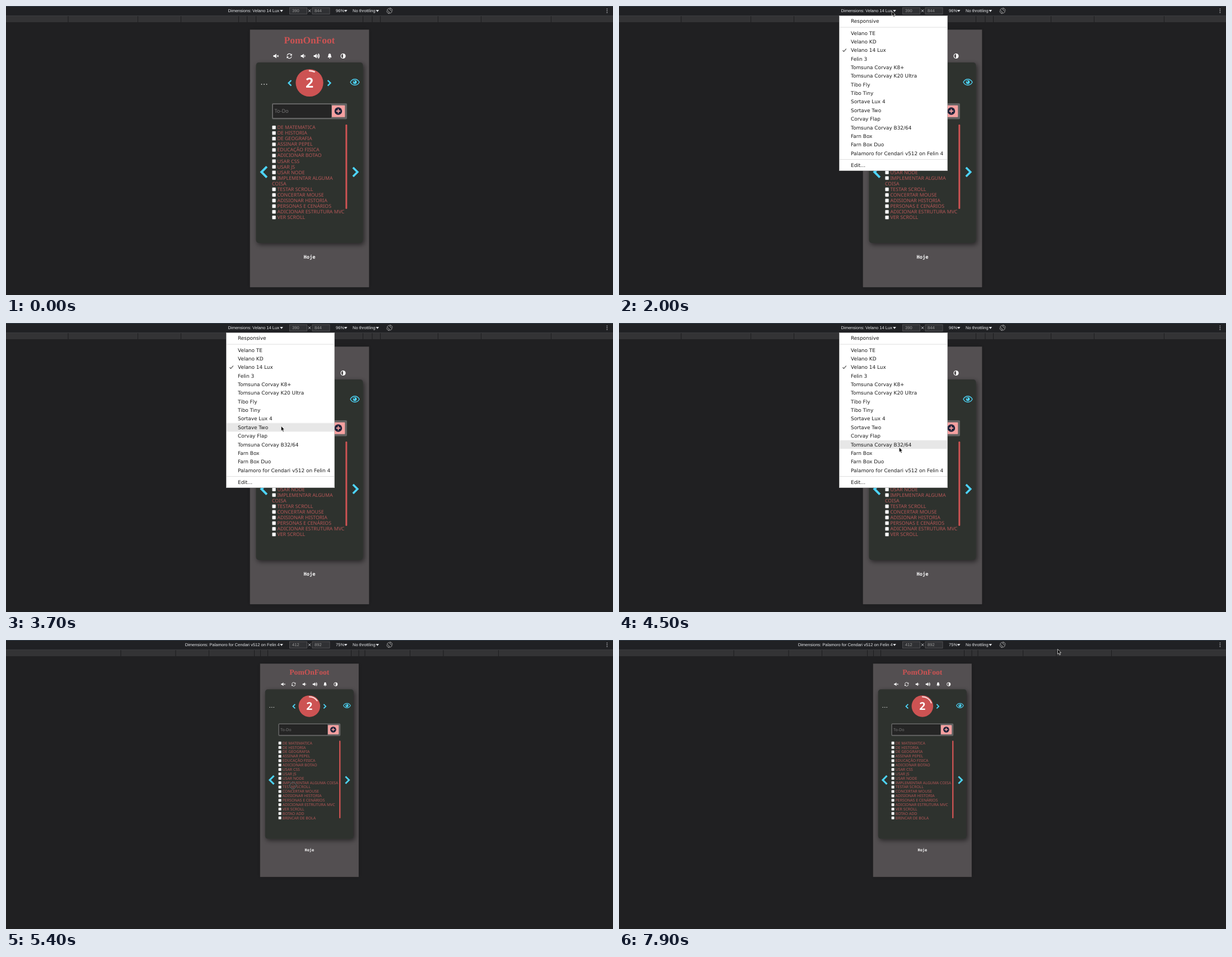
Write an HTML page that moves like this. It is 1084 by 517 pixels and loops after 8 s.

```html
<!DOCTYPE html>
<html lang="pt">
<head>
<meta charset="utf-8">
<title>Device preview</title>
<style>
html, body { margin: 0; width: 100%; height: 100%; overflow: hidden; background: #202022; }
svg { display: block; width: 100vw; height: 100vh; text-rendering: geometricPrecision; }
text { white-space: pre; }
.bar { font: 7.55px "Liberation Sans", Arial, sans-serif; fill: #e4e6e9; }
.bar .dim { fill: #999; }
.title { font: bold 17.4px "Liberation Serif", Times, serif; fill: #cd5353; text-anchor: middle; }
.list { font: 8.78px "Noto Sans", sans-serif; fill: #b45757; }
.hint { font: 9.2px "Noto Sans", sans-serif; fill: #777; }
.count { font: 800 24.5px "Noto Sans", "Open Sans", sans-serif; fill: #fff; text-anchor: middle; }
.today { font: bold 8.71px "DejaVu Sans Mono", monospace; fill: #fff; text-anchor: middle; }
.menu { font: 8.93px "DejaVu Sans", sans-serif; fill: #1c1c1c; }
.line { fill: none; stroke-linecap: round; stroke-linejoin: round; }
.cyan { fill: none; stroke: #4dd4f7; }

#before, #after, #menu, #row, #arrow, #wait { animation: 8s step-end infinite; }
#before { animation-name: before; }
#after { animation-name: after; }
#menu { animation-name: menu; }
#row { animation-name: row; }
#arrow { animation-name: move; }
#wait { animation-name: wait; }
.arc { animation: arc 8s linear infinite; }

@keyframes arc { from { stroke-dasharray: 24 360; } to { stroke-dasharray: 70 360; } }
@keyframes before { 0% { visibility: visible; } 67.5%, 100% { visibility: hidden; } }
@keyframes after { 0% { visibility: hidden; } 67.5%, 100% { visibility: visible; } }
@keyframes menu { 0% { visibility: hidden; } 25% { visibility: visible; } 67.5%, 100% { visibility: hidden; } }
@keyframes wait { 0% { visibility: hidden; } 67.5% { visibility: visible; } 73.75%, 100% { visibility: hidden; } }
@keyframes row {
  0% { opacity: 0; }
  37.5% { opacity: 1; transform: translateY(calc(5 * 15.37px)); }
  38.75% { opacity: 1; transform: translateY(calc(6 * 15.37px)); }
  41.25% { opacity: 1; transform: translateY(calc(7 * 15.37px)); }
  42.5% { opacity: 1; transform: translateY(calc(8 * 15.37px)); }
  43.75% { opacity: 1; transform: translateY(calc(9 * 15.37px)); }
  56.25% { opacity: 1; transform: translateY(calc(11 * 15.37px)); }
  57.5%, 100% { opacity: 1; transform: translateY(calc(14 * 15.37px)); }
}
@keyframes move {
  0% { transform: translate(528px, -14px); }
  5% { transform: translate(528px, -12px); animation-timing-function: steps(8); }
  15% { transform: translate(486px, 1px); animation-timing-function: steps(7); }
  23.75% { transform: translate(487px, 9px); }
  30% { transform: translate(487px, 13px); }
  31.25% { transform: translate(488px, 17px); }
  37.5% { transform: translate(493px, 121px); }
  38.75% { transform: translate(492px, 145px); }
  41.25% { transform: translate(492px, 158px); }
  42.5% { transform: translate(491px, 172px); }
  43.75% { transform: translate(491px, 183px); }
  46.25% { transform: translate(491px, 184px); }
  52.5% { transform: translate(490px, 183px); }
  53.75% { transform: translate(491px, 184px); }
  56.25% { transform: translate(500px, 222px); }
  57.5% { transform: translate(513px, 258px); }
  60% { transform: translate(513px, 259px); }
  61.25% { transform: translate(514px, 259px); }
  63.75% { transform: translate(512px, 260px); }
  67.5% { transform: translate(512px, -20px); }
  73.75% { transform: translate(540px, 221px); }
  76.25% { transform: translate(450px, 79px); }
  78.75% { transform: translate(418px, 23px); }
  81.25% { transform: translate(420px, 4px); }
  83.75% { transform: translate(422px, 5px); }
  85% { transform: translate(426px, 8px); }
  87.5% { transform: translate(480px, 20px); }
  88.75% { transform: translate(570px, 40px); }
  91.25% { transform: translate(721px, 44px); }
  93.75% { transform: translate(751px, 41px); }
  96.25% { transform: translate(750px, 40px); }
  98.75%, 100% { transform: translate(783px, 16px); }
}
</style>
</head>
<body>
<svg id="stage" viewBox="0 0 1084 517" preserveAspectRatio="none"></svg>
<script>
const rect = (x, y, w, h, fill, more = '') =>
  `<rect x="${x}" y="${y}" width="${w}" height="${h}" fill="${fill}" ${more}/>`;
const text = (x, y, s, cls = '') => `<text x="${x}" y="${y}" class="${cls}">${s}</text>`;
const at = (x, y, k, body) => `<g transform="translate(${x} ${y}) scale(${k})">${body}</g>`;
const path = (d, more = '') => `<path d="${d}" ${more}/>`;
const each = (list, fn) => list.map(fn).join('');

const speaker = path('M-4.5-1.5h2L.8-4V4L-2.5 1.5h-2Z', 'fill="#fff"');
const stroke = d => path(d, 'class="line" stroke="#fff" stroke-width="1.1"');
const icons = [
  speaker + stroke('M2.3-1.1 4.5 1.1M4.5-1.1 2.3 1.1'),
  stroke('M-4-1A4.1 4.1 0 0 1 3.4-2.4M4 1A4.1 4.1 0 0 1-3.4 2.4') +
    path('M4.6-4.2V-.8H1.2ZM-4.6 4.2V.8h3.4Z', 'fill="#fff"'),
  `<g transform="translate(1)">${speaker}${stroke('M2.3-1.4a2 2 0 0 1 0 2.8')}</g>`,
  speaker + stroke('M2-1.3a1.8 1.8 0 0 1 0 2.6M3-2.7a3.8 3.8 0 0 1 0 5.4M4-4a5.6 5.6 0 0 1 0 8'),
  path('M0-4.6C2-4.2 2.4-2.6 2.4-1 2.4 1 3.5 1.7 3.5 2.5h-7C-3.5 1.7-2.4 1-2.4-1-2.4-2.6-2-4.2 0-4.6ZM-1.2 3.2h2.4a1.2 1.2 0 0 1-2.4 0Z', 'fill="#fff"'),
  '<circle r="4" fill="none" stroke="#fff" stroke-width="1.2"/>' + path('M0-4a4 4 0 0 1 0 8Z', 'fill="#fff"')
];
const eye = path('M-8 0C-4.5-7 4.5-7 8 0 4.5 7-4.5 7-8 0Z', 'class="cyan" stroke-width="1.4"') +
  '<circle r="3.4" cy="-.1" fill="#4dd4f7"/><circle r="1.2" cx="-1.2" cy="-1.2" fill="#2d302f"/>';
const dots = each([-4.5, 0, 4.5], x => `<circle cx="${x}" r=".85" fill="#fff"/>`);
const dial = '<circle r="24.6" fill="#cd5353"/>' +
  '<circle class="arc line" r="21.6" pathLength="360" transform="rotate(-90)" stroke="#f8dddd" stroke-width="2.6"/>' +
  text(0, 8.8, '2', 'count');
const plus = '<circle r="6.8" fill="#20233a"/>' + path('M-3.7 0h7.4M0-3.7v7.4', 'stroke="#f5a0a0" stroke-width="1.8"');
const chevron = (dir, w, h, weight) =>
  path(`M${-dir * w} ${-h}L${dir * w} 0 ${-dir * w} ${h}`, `class="cyan" stroke-width="${weight}"`);

const tasks = ['DE MATEMATICA', 'DE HISTORIA', 'DE GEOGRAFIA', 'ASSINAR PEPEL', 'EDUCAÇÃO FISICA',
  'ADICIONAR BOTAO', 'USAR CSS', 'USAR JS', 'USAR NODE', 'IMPLEMENTAR ALGUMA COISA', 'TESTAR SCROLL',
  'CONCERTAR MOUSE', 'ADISIONAR HISTORIA', 'PERSONAS E CENÁRIOS', 'ADICIONAR ESTRUTURA MVC',
  'VER SCROLL', 'BOTAO ADD', 'BRINCAR DE BOLA'];

// A task line starting with "+" continues the one above, without a checkbox.
const task = (s, i) => s[0] === '+'
  ? text(0, i * 10.06 + 3.1, s.slice(1), 'list')
  : rect(.3, i * 10.06 - 3.1, 6.5, 6.5, '#fff', 'rx="1.2" stroke="#767676" stroke-width=".5"') +
    text(9.4, i * 10.06 + 3.1, s, 'list');

// zoom scales the contents, room scales the space they are spread over.
function phone(cx, zoom, room, lines, barEnd) {
  const put = (x, y, body) => at(x * room, y * room, zoom, body);
  const cardTop = 42 + 59 * zoom, mid = 87 * room;
  const barTop = 111 * room;
  const card = rect(-95.5 * room, 0, 191 * room, 323 * room, '#2d302f', 'rx="5" filter="url(#shade)"') +
    put(-81, 39, dots) + put(81, 35.2, eye) + put(0, 36.5, dial) +
    at(-35 * zoom, 36.8 * room, zoom, chevron(-1, 2.4, 4.8, 2.4)) +
    at(35 * zoom, 36.8 * room, zoom, chevron(1, 2.4, 4.8, 2.4)) +
    put(-81, 196, chevron(-1, 4.8, 9.6, 4)) + put(81.7, 196, chevron(1, 4, 8, 3.6)) +
    rect(-67 * room, mid - 14 * zoom, 134 * room, 28.6 * zoom, '#626262', 'rx="2"') +
    rect(-64.5 * room, mid - 11.2 * zoom, 103 * room, 22.6 * zoom, '#252525', 'stroke="#171717" stroke-width=".8"') +
    rect(40 * room, mid - 10.2 * zoom, 23.3 * room, 21 * zoom, '#f5a0a0', 'rx="1"') +
    put(51.4, 87, plus) + put(-62.6, 87, text(0, 3.4, 'To-Do', 'hint')) +
    put(-67, 116.1, each(lines, task)) +
    rect(64.3 * room, barTop, 3 * zoom, barEnd - cardTop - barTop, '#cd5353', 'rx="1.3"');
  return rect(cx - 106.3 * room, 42.3, 212.6 * room, 460.8 * room, '#535051', 'filter="url(#glow)"') +
    at(cx, 42 + 25 * zoom, zoom, text(0, 0, 'PomOnFoot', 'title')) +
    each(icons, (icon, i) => at(cx + (i * 24 - 60) * zoom, 42 + 47.5 * zoom, zoom, icon)) +
    at(cx, cardTop, 1, card) +
    at(cx, cardTop + 323 * room + 28 * zoom, zoom, text(0, 0, 'Hoje', 'today'));
}

const scene = (id, x, device, w, h, percent, ticks, body) => `<g id="${id}"><g class="bar">` +
  text(x, 11.4, 'Dimensions: ' + device) + text(511, 11.4, w, 'dim') + text(551, 11.4, h, 'dim') +
  text(589, 11.4, percent) + '</g>' + each(ticks, t => rect(t - .5, 18, 1, 11, '#1d1d1f')) + body + '</g>';

const toolbar = rect(0, 0, 1084, 17.5, '#202124') + rect(0, 0, 1084, 1, '#34404c') +
  rect(0, 17, 1084, 1, '#3b3c3f') + rect(0, 18, 1084, 11, '#333335') +
  each([506.5, 547], x => rect(x, 3, 31, 11.5, '#303134', 'stroke="#59595b" stroke-width=".8"')) +
  each([492, 606.7, 663.3], x => path(`M${x - 2.8} 7h5.6l-2.8 3.8Z`, 'fill="#dfe1e4"')) +
  `<g class="bar">${text(619, 11.4, 'No throttling')}</g>` +
  path('M540 6.5l4.2 4.2M544.2 6.5 540 10.7', 'stroke="#e4e6e9" stroke-width=".9"') +
  at(685, 8.6, 1, rect(-2.1, -4.3, 4.2, 8.6, 'none', 'rx=".7" transform="rotate(-45)" stroke="#bbb" stroke-width=".9"') +
    path('M1.6-3.4.3-5A5 5 0 0 1 5-.4M-1.6 3.4-.3 5A5 5 0 0 1-5 .4', 'class="line" stroke="#bbb" stroke-width=".8"')) +
  each([5.3, 8.5, 11.7], y => `<circle cx="1073.4" cy="${y}" r=".9" fill="#aaacb0"/>`);

const devices = ['Velano TE', 'Velano KD', 'Velano 14 Lux', 'Felin 3', 'Tomsuna Corvay K8+',
  'Tomsuna Corvay K20 Ultra', 'Tibo Fly', 'Tibo Tiny', 'Sortave Lux 4', 'Sortave Two', 'Corvay Flap',
  'Tomsuna Corvay B32/64', 'Farn Box', 'Farn Box Duo', 'Palamoro for Cendari v512 on Felin 4'];

const menu = '<g id="menu" class="menu">' +
  rect(393.5, 17.5, 193, 277, '#fff', 'stroke="#bdbdbd"') +
  rect(394, 40.6, 192, 15.4, '#e7e7e7', 'id="row"') +
  rect(394, 37.6, 192, 1, '#dedede') + rect(394, 274, 192, 1, '#dedede') +
  text(414, 30.2, 'Responsive') + text(414, 288.2, 'Edit…') +
  each(devices, (name, i) => text(414, 51.5 + i * 15.37, name)) +
  path('M399.5 79.3l2 2.2 4.3-5', 'fill="none" stroke="#333" stroke-width="1.1"') + '</g>';

const wrapped = tasks.slice(0, 16);
wrapped.splice(9, 1, 'IMPLEMENTAR ALGUMA', '+COISA');

document.getElementById('stage').innerHTML = `<defs>
  <filter id="shade" x="-20%" y="-20%" width="140%" height="140%"><feDropShadow dx="2" dy="3" stdDeviation="4" flood-opacity=".55"/></filter>
  <filter id="glow" x="-20%" y="-20%" width="140%" height="140%"><feDropShadow dx="0" dy="0" stdDeviation="4" flood-opacity=".18"/></filter>
  </defs>` + rect(0, 0, 1084, 517, '#202022') + toolbar +
  scene('before', 396.5, devices[2], 390, 844, '96%',
    [111, 235.5, 312.5, 415.5, 430.5, 446.5, 637.5, 654, 668.5, 771.5, 848.5, 973.5],
    phone(542, 1, 1, wrapped, 363)) +
  scene('after', 319.7, devices[14], 412, 892, '75%',
    [205, 303, 362.5, 443.5, 454.5, 467.5, 616.5, 630, 641, 721.5, 781, 879.5],
    phone(541.8, .7825, .828, tasks, 319)) +
  menu +
  '<g id="wait"><circle cx="512.5" cy="260.5" r="5.8" fill="none" stroke="#1b1b1b" stroke-width="2"/>' +
  '<circle cx="512.5" cy="260.5" r="5.8" fill="none" stroke="#858585" stroke-width="1"/></g>' +
  path('M.3.3V9.2L2.3 7.4 3.8 10.8 5.3 10.1 3.8 6.8H6.4Z', 'id="arrow" fill="#000" stroke="#fff" stroke-width=".7"');
</script>
</body>
</html>
```
